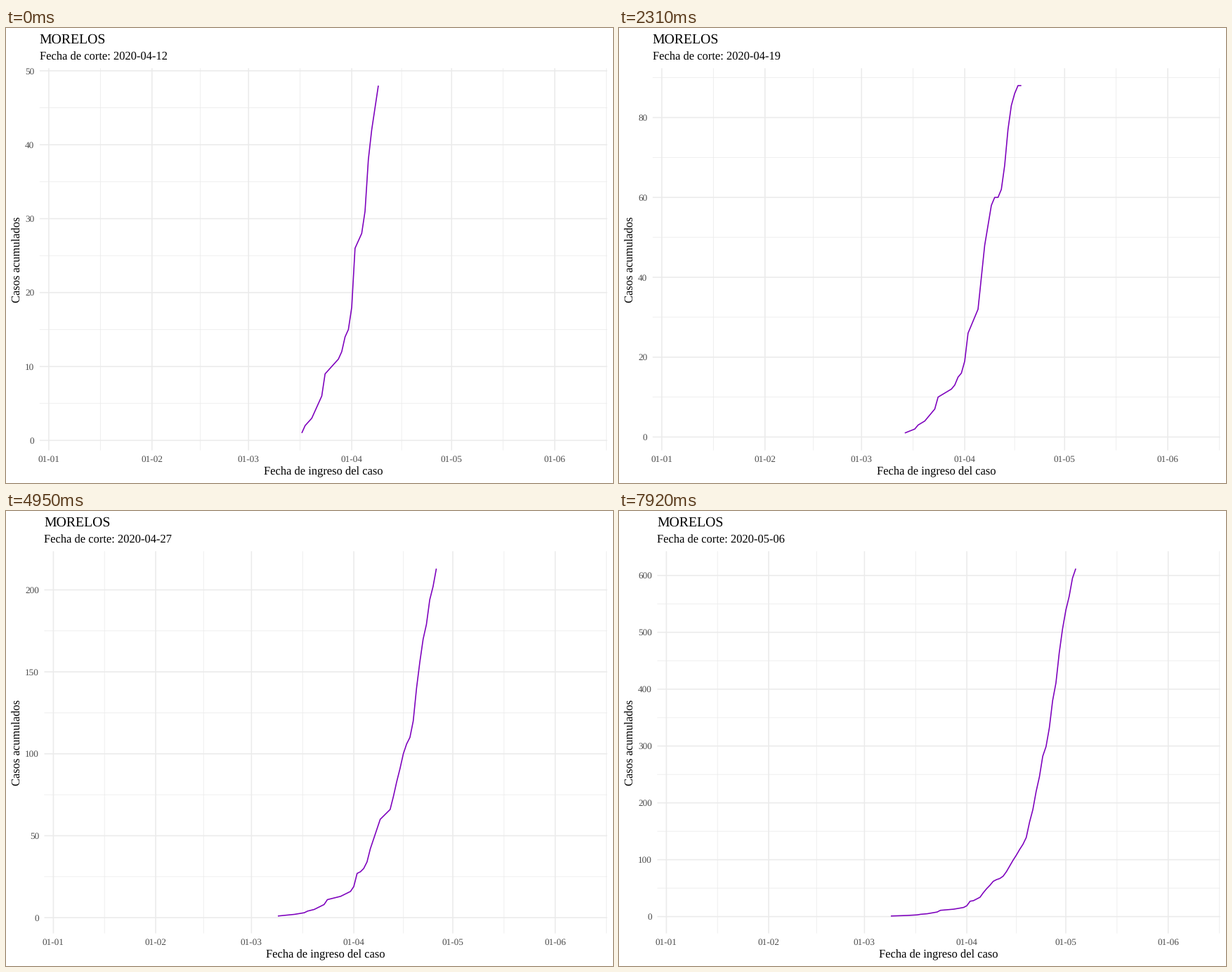
Write a matplotlib script that moves like this. It is 864 px wide and 648 px high and loops after 8000 ms.

```python
import math

import numpy as np
import matplotlib.pyplot as plt
from matplotlib.animation import FuncAnimation
from matplotlib.collections import LineCollection

W, H, DPI = 864, 648, 108
LOOP, STEP, HOLD = 8000, 20, 330
TOP, BOTTOM, RIGHT = 57.3, 601.55, 855.75
GRID, PURPLE, GREY = "#EBEBEB", "#7D00BD", "#4D4D4D"
PT = DPI / 72

# Days are counted from 1 January 2020.
FIRST_CUT, DENSE = 102, 92
DAY_MIN, DAY_SPAN = -2.75, 170.5
LENGTHS = np.array([31, 29, 31, 30, 31, 31])
MONTHS = np.cumsum(LENGTHS) - LENGTHS
MID_MONTHS = MONTHS + LENGTHS / 2

# Final cumulative cases: sparse days first, then every day.
EARLY_DAYS = [68, 73, 76, 77, 79, 82, 83, 87, 88, 89, 90, 91]
EARLY = [1, 2, 3, 4, 5, 8, 11, 13, 14, 15, 16, 19]
DAILY = [27, 28, 31, 34, 42, 49, 55, 62, 65, 67, 71, 79, 89, 99, 108, 118,
         127, 139, 166, 188, 220, 246, 282, 299, 332, 380, 411, 464, 506,
         539, 563, 595, 612]
DAYS = np.r_[EARLY_DAYS, DENSE + np.arange(len(DAILY))]

# Older reports, newest first: (cut, last day, day before which one case is
# missing, cases missing on the last days compared with the next report).
REVISIONS = [
    (22, 122, 0, [1, 4, 4, 4, 5, 3, 6, 7, 11, 25, 45, 62]),
    (18, 119, 0, [6, 9, 10, 14, 16, 23, 30, 35, 37, 49, 68, 83, 129]),
    (12, 112, 89, [1, 1, 1, 1, 1, 1, 3, 3, 3, 3, 4, 6, 7, 11, 15, 17, 23,
                   30, 47]),
    (9, 109, 0, [0, 2, 1, 1, 5, 7, 7, 13]),
    (5, 106, 98, [2, 3, 3, 3, 5, 6, 6, 8, 10]),
    (0, 99, 0, [1, 1, 2, 5, 7, 9]),
]
FADE = 0.65


def build_reports():
    cases = np.r_[EARLY, DAILY]
    reports = [(24, DAYS[-1], cases)]
    for cut, end, lack, tail in REVISIONS:
        pos = DAYS - end + len(tail) - 1
        missing = np.interp(pos, range(len(tail)), tail)
        missing = np.where(pos < 0, np.maximum(tail[0] + FADE * pos, 0), missing)
        missing = np.maximum(np.round(missing), DAYS < lack)
        cases = cases - missing
        cases = np.where(DAYS > end, cases[DAYS == end], cases)
        reports.insert(0, (cut, end, cases))
    return reports


REPORTS = build_reports()


def curve(cut):
    """Days and cumulative cases as known at a given cut."""
    i = max(j for j, r in enumerate(REPORTS) if r[0] <= cut)
    a, b = REPORTS[i], REPORTS[min(i + 1, len(REPORTS) - 1)]
    f = (cut - a[0]) / max(b[0] - a[0], 1)
    end = round(a[1] + f * (b[1] - a[1]))
    late = np.round(a[2] + f * (b[2] - a[2]))
    cases = np.where(DAYS < DENSE, (b if f >= 0.5 else a)[2], late)
    keep = (DAYS <= end) & (cases > 0)
    return DAYS[keep], cases[keep]


def pretty_step(span):
    cell = span / 5
    base = 10 ** math.floor(math.log10(cell))
    unit = base
    for mult, bias in ((2, 1.5), (5, 2.75), (10, 1.5)):
        if mult * base - cell >= bias * (cell - unit):
            break
        unit = mult * base
    return unit


def cut_date(cut):
    day = FIRST_CUT + cut
    return f"2020-04-{day - 90:02d}" if day < 121 else f"2020-05-{day - 120:02d}"


plt.rcParams["font.family"] = "Liberation Serif"
plt.rcParams["text.hinting"] = "none"
fig = plt.figure(figsize=(W / DPI, H / DPI), dpi=DPI, facecolor="white")
ax = fig.add_axes([0, 0, 1, 1])
ax.set(xlim=(0, W), ylim=(H, 0))
ax.axis("off")


def label(x, y, text, size, color="black", ha="left", **kw):
    return ax.text(x, y, text, fontsize=size, color=color, ha=ha,
                   va="baseline", **kw)


def grid(width):
    lines = LineCollection([], colors=GRID, linewidths=width, snap=False,
                           capstyle="butt")
    ax.add_collection(lines, autolim=False)
    return lines


minor, major = grid(0.53), grid(1.067)
line, = ax.plot([], [], color=PURPLE, lw=1.067, solid_capstyle="butt",
                solid_joinstyle="round", snap=False)
title = label(0, 21.7, "MORELOS", 13.2)
subtitle = label(0, 45.5, "", 11)
x_title = label(0, 636.2, "Fecha de ingreso del caso", 11, ha="center")
label(19.5, (TOP + BOTTOM) / 2, "Casos acumulados", 11, ha="center",
      rotation=90, rotation_mode="anchor")
x_labels = [label(0, 618, f"01-{m + 1:02d}", 8.8, GREY, "center")
            for m in range(len(MONTHS))]
y_labels = [label(0, 0, "", 8.8, GREY, "right") for _ in range(9)]


def show(cut):
    days, cases = curve(cut)
    pad = 0.05 * (cases[-1] - 1)
    lo, hi = 1 - pad, cases[-1] + pad
    step = pretty_step(hi - lo)
    ticks = np.arange(0, hi, step)
    mids = np.arange(step / 2, hi, step)

    digits = len(str(int(ticks[-1])))
    text_right = 27.25 + digits * 4.4 * PT
    left = text_right + 7.43

    def px(day):
        return left + (np.asarray(day) - DAY_MIN) / DAY_SPAN * (RIGHT - left)

    def py(value):
        return BOTTOM - (np.asarray(value) - lo) / (hi - lo) * (BOTTOM - TOP)

    def rules(values, dates):
        return ([[(left, y), (RIGHT, y)] for y in py(values)]
                + [[(x, TOP), (x, BOTTOM)] for x in px(dates)])

    minor.set_segments(rules(mids, MID_MONTHS))
    major.set_segments(rules(ticks, MONTHS))
    line.set_data(px(days), py(cases))
    title.set_x(left)
    subtitle.set_x(left)
    subtitle.set_text("Fecha de corte: " + cut_date(cut))
    x_title.set_x((left + RIGHT) / 2)
    for text, x in zip(x_labels, px(MONTHS)):
        text.set_x(x)
    for i, text in enumerate(y_labels):
        text.set_visible(i < len(ticks))
        if i < len(ticks):
            text.set_text(f"{ticks[i]:.0f}")
            text.set_position((text_right, py(ticks[i]) + 4.46))


def update(i):
    show((i * STEP + STEP - 1) // HOLD)
    return []


anim = FuncAnimation(fig, update, frames=LOOP // STEP, interval=STEP,
                     init_func=lambda: update(0), repeat=True, repeat_delay=0)
plt.show()
```
